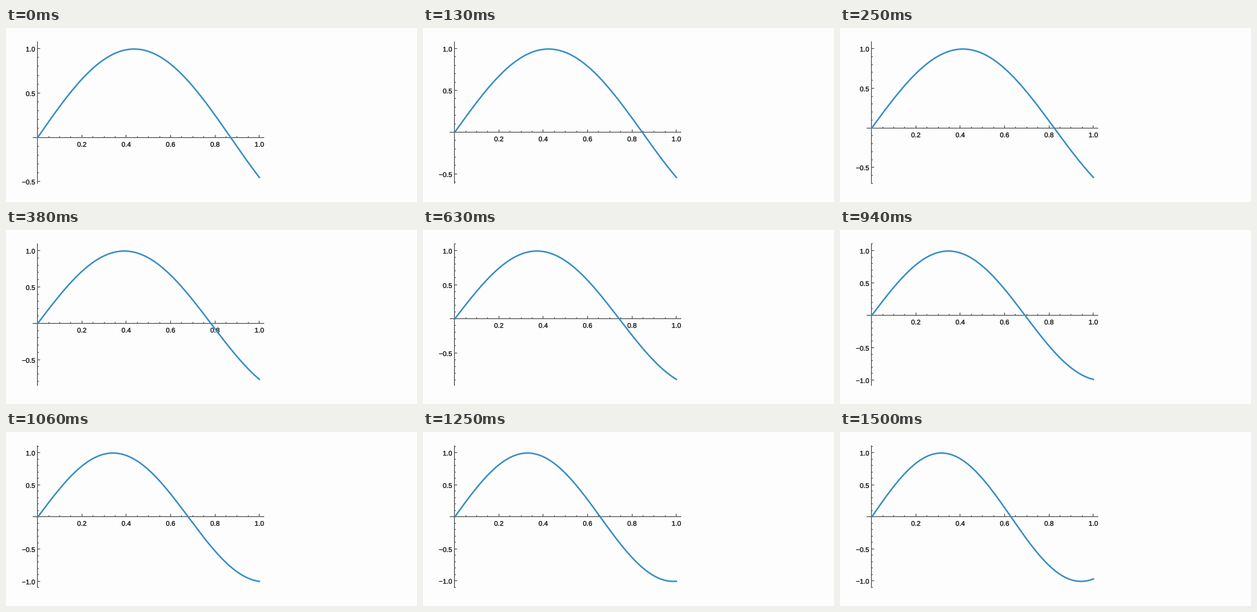
A matplotlib script for the animation above (1560 ms loop, 608 px wide and 258 px high).

```python
import numpy as np
import matplotlib.pyplot as plt
from matplotlib.animation import FuncAnimation
from matplotlib.collections import LineCollection
from matplotlib.patheffects import Stroke

W, H, DPI = 608, 258, 100
FRAMES, LOOP_MS = 25, 1560
PX = 72 / DPI  # points per pixel

BACK, AXIS, INK, BLUE = "#fdfdfd", "#505050", "#080808", "#328bc4"
X0, X_UNIT = 46.6, 328.2
AXIS_X, AXIS_LEFT, AXIS_RIGHT = 46.5, 39.5, 382
AXIS_TOP, AXIS_BOTTOM = 20, 231
CURVE_TOP, CURVE_BOTTOM = 31.2, 221.5
MAJOR, MINOR = 4, 2

KEY_FRAMES = [0, 4, 6, 10, 13, 17, 24]
KEY_FREQS = [3.605, 3.81, 4.015, 4.225, 4.45, 4.615, 4.99]

xs = np.linspace(0, 1, 400)

fig = plt.figure(figsize=(W / DPI, H / DPI), dpi=DPI, facecolor=BACK)
ax = fig.add_axes([0, 0, 1, 1])
ax.set_xlim(0, W)
ax.set_ylim(H, 0)
ax.axis("off")


def snap(y):
    """Centre of the pixel row that holds y."""
    return np.floor(y - 0.65) + 0.5


def label(x, text, align):
    # Outlined glyphs are drawn unhinted and a little heavier.
    return ax.text(x, 0, text, ha=align, va="baseline", color=INK,
                   family="Liberation Sans", size=10 * PX, zorder=2,
                   path_effects=[Stroke(linewidth=0.3 * PX, foreground=INK)])


axes_lines = LineCollection([], colors=AXIS, linewidths=1.15 * PX, zorder=1)
axes_lines.set_snap(False)
ax.add_collection(axes_lines)
curve, = ax.plot([], [], color=BLUE, lw=2.2 * PX, zorder=3,
                 solid_capstyle="projecting", solid_joinstyle="round")

x_labels = [label(X0 + X_UNIT * v, f"{v:.1f}", "center")
            for v in (0.2, 0.4, 0.6, 0.8, 1.0)]
y_labels = {v: label(43.3, f"{v:.1f}".replace("-", "\u2212"), "right")
            for v in (-1.0, -0.5, 0.5, 1.0)}


def draw(i):
    freq = np.interp(i, KEY_FRAMES, KEY_FREQS)
    wave = np.sin(freq * xs)
    unit = (CURVE_BOTTOM - CURVE_TOP) / (1 - wave.min())
    zero = CURVE_TOP + unit
    base = snap(zero)

    curve.set_data(X0 + X_UNIT * xs, zero - unit * wave)

    lines = [[(AXIS_LEFT, base), (AXIS_RIGHT, base)],
             [(AXIS_X, AXIS_TOP), (AXIS_X, AXIS_BOTTOM)]]
    for n in range(1, 21):
        x = np.floor(X0 + X_UNIT * n / 20) + 0.5
        size = MINOR if n % 4 else MAJOR
        lines.append([(x, base), (x, base - size)])
    for n in range(-11, 12):
        y = snap(zero - unit * n / 10)
        if n and AXIS_TOP < y < AXIS_BOTTOM:
            size = MINOR if n % 5 else MAJOR
            lines.append([(AXIS_X, y), (AXIS_X + size, y)])
    axes_lines.set_segments(lines)

    for text in x_labels:
        text.set_y(base + 13.5)
    for value, text in y_labels.items():
        y = snap(zero - unit * value)
        text.set_y(y + 4.4)
        text.set_visible(y < AXIS_BOTTOM)
    return [axes_lines, curve, *x_labels, *y_labels.values()]


anim = FuncAnimation(fig, draw, frames=FRAMES, interval=LOOP_MS / FRAMES,
                     init_func=lambda: draw(0), repeat=True, repeat_delay=0)
plt.show()
```
